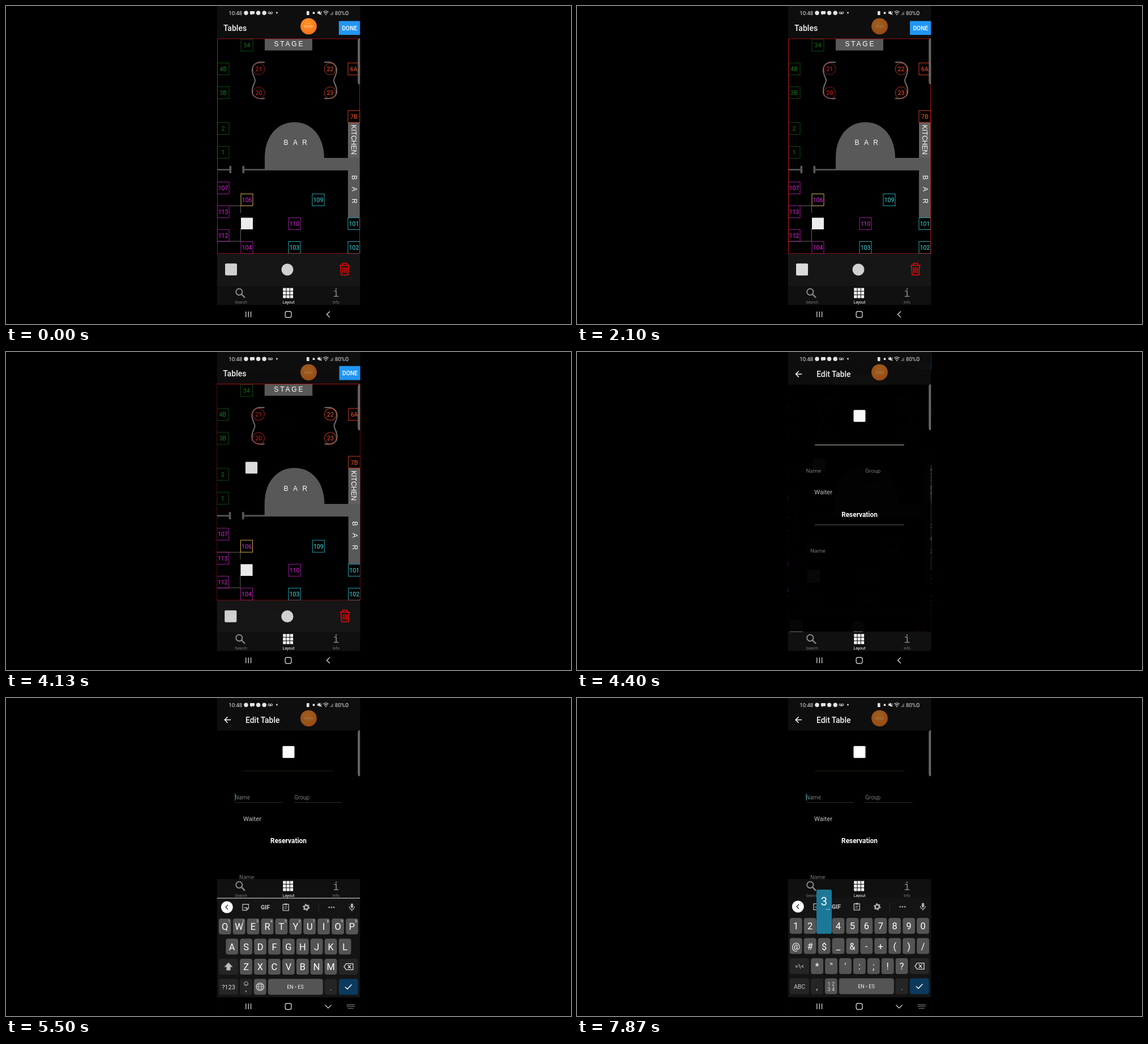
Animation of 998x561 px, one loop 8 s. Source, as an HTML page:

```html
<!DOCTYPE html>
<html lang="en">
<head>
<meta charset="utf-8">
<title>Table layout editor</title>
<style>
html, body { margin: 0; width: 100%; height: 100%; overflow: hidden; background: #000; }
svg { display: block; width: 998px; height: 561px; font-family: Roboto, sans-serif; }
.plan { font-family: "Liberation Sans", Arial, sans-serif; }
</style>
</head>
<body>
<svg id="stage" viewBox="0 0 998 561"></svg>
<script>
const LOOP = 8000;
const GREY = '#595959';
const stage = document.getElementById('stage');

const esc = s => String(s).replace(/&/g, '&amp;').replace(/</g, '&lt;');
const rect = (x, y, w, h, fill, extra = '') =>
  `<rect x="${x}" y="${y}" width="${w}" height="${h}" fill="${fill}" ${extra}/>`;
const circle = (x, y, r, fill, extra = '') =>
  `<circle cx="${x}" cy="${y}" r="${r}" fill="${fill}" ${extra}/>`;
const line = (d, color, width = 1, extra = '') =>
  `<path d="${d}" fill="none" stroke="${color}" stroke-width="${width}" ${extra}/>`;
// y is the middle of the capitals
const text = (s, x, y, size, fill, extra = '') =>
  `<text x="${x}" y="${y + size * 0.356}" font-size="${size}" fill="${fill}" ${extra}>${esc(s)}</text>`;
const mid = (s, x, y, size, fill, extra = '') =>
  text(s, x, y, size, fill, 'text-anchor="middle" ' + extra);
const group = (id, body, extra = '') => `<g id="${id}" ${extra}>${body}</g>`;
// a band across the whole phone
const band = (y, h, fill) => rect(372.6, y, 253, h, fill);

const tables = [
  { text: '#1c7a20', edge: '#0d4a10', at: { 34: [425.5, 69], '4B': [383.5, 111], '3B': [383.5, 153], 2: [383.5, 216], 1: [383.5, 258] } },
  { text: '#d8262a', edge: '#96191c', round: true, at: { 21: [446.5, 111], 20: [446.5, 153] } },
  { text: '#ff5436', edge: '#b8361f', round: true, at: { 22: [572.5, 111], 23: [572.5, 153] } },
  { text: '#ff5430', edge: '#c83c1c', at: { '6A': [614.5, 111], '7B': [614.5, 195] } },
  { text: '#e02ae0', edge: '#9a1c9a', at: { 107: [383.5, 321], 113: [383.5, 363], 112: [383.5, 405], 104: [425.5, 426], 110: [509.5, 384] } },
  { text: '#e02ae0', edge: '#d8b04a', at: { 106: [425.5, 342] } },
  { text: '#48e0e8', edge: '#25a5b0', at: { 109: [551.5, 342], 101: [614.5, 384], 103: [509.5, 426], 102: [614.5, 426] } }
];

function drawTables() {
  return tables.map(kind => Object.entries(kind.at).map(([name, [x, y]]) => {
    const edge = `stroke="${kind.edge}"`;
    const shape = kind.round ? circle(x, y, 10.3, 'none', edge) : rect(x - 10.5, y - 10.5, 21, 21, 'none', edge);
    return shape + mid(name, x, y + 0.3, 10.5, kind.text);
  }).join('')).join('');
}

function drawPlan() {
  const brace = line('M457 99.5C442 97 434 104 435 115C436 124 440 127 440 131.5C440 136 435 140 435 149C434 159 442 165 457 163', '#6e6e6e', 2);
  return rect(457, 58, 84, 20.5, GREY) +
    `<path d="M457 290V268C457 230 479 205 509.5 205S562 230 562 268H604V205H625V373H604V290Z" fill="${GREY}"/>` +
    rect(604, 205, 21, 63, '#626060') +
    line('M373 288.7H397M419 288.7H458', GREY, 2.6) +
    rect(394.5, 282, 3.6, 13, GREY) + rect(417.5, 282, 3.6, 13, GREY) +
    line('M373 352.5H414.5V365M414.5 392V415H373', '#66665a') +
    brace + `<g transform="matrix(-1 0 0 1 1019 0)">${brace}</g>` +
    `<g class="plan">` +
    text('STAGE', 473.5, 66.7, 12, '#fff', 'letter-spacing="2.8"') +
    text('BAR', 490.5, 240.5, 12, '#fff', 'letter-spacing="8.4"') +
    `<g transform="translate(614 209.5) rotate(90)">${text('KITCHEN', 0, 0, 12, '#fff')}</g>` +
    `<g transform="translate(615 298.5) rotate(90)">${text('BAR', 0, 0, 12, '#fff', 'letter-spacing="12.6"')}</g></g>` +
    drawTables() + rect(415, 373.5, 21, 20.5, '#ececec') +
    rect(373.5, 57.8, 251.2, 379, 'none', 'stroke="#bd1418"');
}

function drawTrash() {
  return line('M589 457.5H607M594 457V454H602V457M591 458L592 474.5H604L605 458M595 461V471M598 461V471M601 461V471', '#e60808', 1.7, 'stroke-linejoin="round"');
}

function drawLayoutPage() {
  return band(0, 494, '#000') + drawPlan() +
    band(0, 57.3, '#0e0e0e') +
    text('Tables', 384, 39.3, 14, '#f4f4f4', 'font-weight="500"') +
    rect(588, 26.5, 37.5, 24.5, '#2196f3', 'rx="1"') +
    mid('DONE', 606.8, 39, 10.2, '#fff', 'font-weight="500"') +
    band(437, 60, '#161616') +
    rect(387, 454.3, 21, 21, '#d0d0d0', 'rx="2"') + circle(497, 465, 10.5, '#d0d0d0') + drawTrash() +
    group('drag', rect(-10.5, -10.3, 21, 20.6, '#dcdcdc', 'rx="1.5"'));
}

function drawEditPage() {
  return band(0, 494, '#000') +
    group('preview', rect(488.5, 102, 21, 21, '#fff', 'rx="1.5"')) +
    group('form',
      group('rules', line('M420 163.8H578', '#8e8e7c', 1.4) + line('M420 305H578', '#62625a')) +
      group('fieldRules', line('M420 163.5H578', '#26241a') + line('M404 219.3H489M509 219.3H593', '#2c2c2c')) +
      text('Name', 404.3, 209.8, 10, '#777') + text('Group', 509.3, 209.8, 10, '#777') +
      group('caret', rect(404.3, 203, 1.2, 13, '#188a80')) +
      text('Waiter', 419, 247.4, 11.2, '#c4c4c4') +
      mid('Reservation', 499, 287, 11.9, '#fff', 'font-weight="700"') +
      text('Name', 412, 350.8, 10, '#777')) +
    band(0, 57.3, '#0e0e0e') +
    line('M397 38.5H386.5M391.5 33.3L386.3 38.5L391.5 43.7', '#fff', 1.5) +
    text('Edit Table', 423, 39, 13.9, '#f4f4f4', 'font-weight="500"');
}

function drawTabs() {
  let cells = '';
  for (let i = 0; i < 9; i++) cells += rect(489.3 + i % 3 * 6.3, 497.5 + Math.floor(i / 3) * 6.3, 5.2, 5.2, '#fff');
  return band(494, 34, '#101010') + cells +
    circle(411.8, 504.3, 5.6, 'none', 'stroke="#888" stroke-width="2"') + line('M416 508.5L422 514.5', '#888', 2.4) +
    mid('i', 583, 506.5, 19, '#888', 'font-family="Noto Sans Mono, monospace"') +
    mid('Search', 415, 523, 7, '#777') + mid('Layout', 499, 523, 7, '#fff') + mid('Info', 583, 523, 7, '#777');
}

function drawStatus() {
  const white = '#e4e4e4';
  return text('10:48', 393.3, 12.5, 9.6, white) +
    circle(424, 12.3, 3.7, white) + line('M431.5 9.5H438.5V14H434.5L433 15.5V14H431.5Z', white, 1, `style="fill:${white}"`) +
    circle(445.6, 12.3, 3.7, white) + circle(456.2, 12.3, 3.7, white) +
    circle(464.7, 12, 1.7, 'none', `stroke="${white}"`) + circle(469.2, 12, 1.7, 'none', `stroke="${white}"`) + line('M464.7 13.7H469.2', white) +
    circle(478.5, 12, 1.4, white) +
    rect(531, 9, 4.6, 7, white, 'rx="1"') + rect(541.8, 10.5, 3.5, 3.5, white) +
    `<path d="M550 10.5H552L555 8.5V15.5L552 13.5H550Z" fill="${white}"/>` + line('M551 8.5L557.5 15.5M557.5 9.5L555.5 15', white) +
    line('M560.5 10.5Q565 7 569.5 10.5M562 12.8Q565 10.5 568 12.8', white, 1.2) + circle(565, 15, 1, white) +
    `<path d="M571.5 16L578 9V16Z" fill="#555"/>` +
    text('80%', 581, 12.5, 9.6, white) + rect(600.3, 9.5, 3.8, 6, 'none', `stroke="${white}" rx="1"`);
}

function drawNav() {
  const white = '#ccc';
  return line('M423.8 539V549M428.2 539V549M432.6 539V549', white, 1.4) +
    rect(493.2, 538.7, 10.8, 10.8, 'none', `rx="3" stroke="${white}" stroke-width="1.4"`) +
    group('navBack', line('M572 538.7L566.5 544L572 549.3', white, 1.4)) +
    group('navHide', line('M563.5 541.5L569 547L574.5 541.5', white, 1.4) +
      line('M602 541H616M602 544H616M604 547.5H614', '#999', 1.6, 'stroke-dasharray="1.6 1"'));
}

const STEP = 24.93;
const KEY = '#545454';
const keyBox = (x, y, w, fill) => rect(x - w / 2, y - 14, w, 28, fill, 'rx="4"');
const keyRow = (chars, x, y) => [...chars].map((c, i) =>
  keyBox(x + i * STEP, y, 21.8, KEY) + mid(c, x + i * STEP, y + 0.4, 16.5, '#fff')).join('');

function drawKeyFrame() {
  const dark = '#252525', icon = '#b4b4b4';
  return band(353, 208, '#141414') +
    circle(390.3, 369, 10.5, '#fff') + line('M392 365L388 369L392 373', '#333', 1.4) +
    line('M418 364H428.5V371L425 374.5H418ZM425 374V371H428M420.5 369Q422.5 372 425 369', icon, 1.3) +
    mid('GIF', 458, 369.3, 10.5, icon, 'font-weight="900"') +
    rect(489.3, 364, 10, 11, 'none', `stroke="${icon}" stroke-width="1.4"`) + rect(492, 362.5, 4.6, 3, icon) + line('M491.5 368.5H497M491.5 371.5H496', icon) +
    circle(530.3, 369.3, 3.6, 'none', `stroke="${icon}" stroke-width="2.4"`) + circle(530.3, 369.3, 5.3, 'none', `stroke="${icon}" stroke-width="1.8" stroke-dasharray="2.4 3.15"`) +
    line('M552.3 362V377', '#2c2c2c') + [570.8, 575, 579.2].map(x => circle(x, 369.3, 1.3, icon)).join('') +
    rect(609, 362.5, 4.2, 8, icon, 'rx="2"') + line('M606.5 368Q607 373 611 373T615.5 368M611 373V376', icon, 1.3) +
    keyBox(393, 474, 34, dark) + keyBox(604.8, 474, 34, dark) +
    line('M597 474L601 468.7H613V479.3H601ZM603.8 471L609.3 477M609.3 471L603.8 477', '#ddd', 1.3) +
    keyBox(393, 509.5, 34, dark) + keyBox(424, 509.5, 21.8, dark) + keyBox(448.8, 509.5, 21.8, KEY) +
    keyBox(511.3, 509.5, 97, KEY) + mid('EN • ES', 511, 509.8, 9, '#f0f0f0') +
    keyBox(573.6, 509.5, 21.8, dark) + mid('.', 573.6, 511, 13, '#ddd') +
    keyBox(604.8, 509.5, 34, '#0b3a5c') + line('M599 509.8L603 513.5L610.5 505.5', '#fff', 1.5);
}

function drawLetters() {
  const hints = [...'1234567890'].map((c, i) => mid(c, 394 + i * STEP, 394, 7, '#ddd')).join('');
  return keyRow('QWERTYUIOP', 386.7, 403) + hints + keyRow('ASDFGHJKL', 399.2, 438.5) + keyRow('ZXCVBNM', 424.1, 474) +
    `<path d="M393 466.5L400.5 474.5H396.5V480.5H389.5V474.5H385.5Z" fill="#bbb"/>` +
    mid('?123', 393, 510, 11, '#ddd') +
    circle(424, 504, 3.5, 'none', 'stroke="#bbb"') + line('M422.3 504.8Q424 507 425.7 504.8', '#bbb', 0.9) + mid(',', 424, 512, 13, '#ddd') +
    circle(448.8, 509.5, 6.8, 'none', 'stroke="#ddd" stroke-width="1.1"') +
    line('M442 509.5H455.6M443.2 506H454.4M443.2 513H454.4M448.8 502.7C444.5 506 444.5 513 448.8 516.3C453 513 453 506 448.8 502.7', '#ddd', 0.9);
}

function drawSymbols() {
  return keyRow('1234567890', 386.7, 403) + keyRow('@#$_&-+()/', 386.7, 438.5) + keyRow('*"\':;!?', 424.1, 474) +
    mid('=\\<', 393, 474, 11, '#ccc') + mid('ABC', 393, 510, 10.5, '#ccc') + mid(',', 424, 511, 14, '#eee') +
    mid('1 2', 448.8, 505.5, 9, '#ddd') + mid('3 4', 448.8, 514.5, 9, '#ddd') +
    group('popup', rect(423, 339, 27, 78, '#1c7897', 'rx="3"') + mid('3', 436.3, 359.5, 20, '#fff') +
      [440.8, 443.3, 445.8].map(x => circle(x, 374, 0.7, '#fff')).join(''));
}

stage.innerHTML = `<defs>
  <clipPath id="phone"><rect x="372.6" y="0" width="253" height="561"/></clipPath>
  <radialGradient id="orange" cx=".45" cy=".35" r=".7"><stop offset="0" stop-color="#ff962a"/><stop offset="1" stop-color="#f4701a"/></radialGradient>
  </defs>` + rect(0, 0, 998, 561, '#000') + `<g clip-path="url(#phone)">` +
  group('layoutPage', drawLayoutPage()) + group('editPage', drawEditPage()) +
  group('tabs', drawTabs()) + band(0, 24, '#0e0e0e') + drawStatus() +
  band(527.5, 34, '#000') +
  group('blank', band(353, 174.5, '#fdfdfd')) +
  group('keyboard', drawKeyFrame() + group('letters', drawLetters()) + group('symbols', drawSymbols())) +
  group('seam', band(352.6, 1, '#e8e8e8')) +
  group('navCover', band(528, 33, '#000')) + drawNav() +
  `<path d="M625.5 57H623.5Q621.3 58 621.3 61V134Q621.3 137 623.5 138H625.5Z" fill="#666"/>` +
  group('recorder', circle(534.5, 35.8, 14.4, 'url(#orange)') + `<text id="timer" x="534.5" y="38" font-size="6" fill="#ffe2a8" text-anchor="middle"></text>`) +
  `</g>`;

const el = {};
stage.querySelectorAll('[id]').forEach(node => el[node.id] = node);

const clamp = v => Math.max(0, Math.min(1, v));
const progress = (t, start, length) => clamp((t - start) / length);
const show = (id, on) => el[id].style.display = on ? '' : 'none';
const move = (id, x, y) => el[id].setAttribute('transform', `translate(${x} ${y})`);
const zoom = (id, s) => el[id].setAttribute('transform', `translate(499 259) scale(${s}) translate(-499 -259)`);
const fade = (id, v) => el[id].setAttribute('opacity', v);

// time, x, y
const dragPath = [[2100, 397.5, 465], [2350, 420, 380], [2700, 472, 228], [3200, 470.3, 212], [3530, 452, 206], [4000, 434, 204.5]];

function pathAt(t) {
  const i = dragPath.findIndex(p => p[0] > t);
  if (i < 1) return dragPath[i < 0 ? dragPath.length - 1 : 0].slice(1);
  const [a, b] = [dragPath[i - 1], dragPath[i]];
  const k = (t - a[0]) / (b[0] - a[0]), e = k * k * (3 - 2 * k);
  return [a[1] + (b[1] - a[1]) * e, a[2] + (b[2] - a[2]) * e];
}

function render(t) {
  fade('recorder', 1 - 0.4 * progress(t, 30, 400));
  el.timer.textContent = '00:0' + Math.max(0, Math.floor((t - 800) / 1000));

  show('drag', t > 2100);
  move('drag', ...pathAt(t));
  fade('drag', t < 4000 ? 0.93 : 1);

  const open = 1 - Math.pow(1 - progress(t, 4123, 400), 3.6);
  zoom('layoutPage', 1 + 0.1 * open);
  show('layoutPage', open < 1);
  zoom('editPage', 0.85 + 0.15 * open);
  show('editPage', open > 0);
  fade('editPage', open * open);

  const settled = t >= 5470;
  move('preview', 0, settled ? -17.2 : 0);
  move('form', 0, settled ? -34.8 : 0);
  move('tabs', 0, settled ? -174.7 : 0);
  show('rules', !settled);
  show('fieldRules', settled);
  show('caret', t >= 5070 && !(t >= 5670 && t < 6170) && !(t >= 6670 && t < 7170));

  const rise = progress(t, 5340, 160);
  const symbols = t >= 7230;
  show('blank', t >= 5340 && t < 5500);
  show('keyboard', rise > 0);
  fade('keyboard', rise);
  move('keyboard', 0, 187 * (1 - rise) - (symbols ? 1 : 0));
  show('letters', !symbols);
  show('symbols', symbols);
  show('seam', settled && !symbols);
  show('popup', t >= 7800);
  show('navCover', settled);
  show('navBack', !settled);
  show('navHide', settled);
}

const began = performance.now();
function tick() {
  render((performance.now() - began) % LOOP);
  requestAnimationFrame(tick);
}
render(0);
requestAnimationFrame(tick);
</script>
</body>
</html>
```
